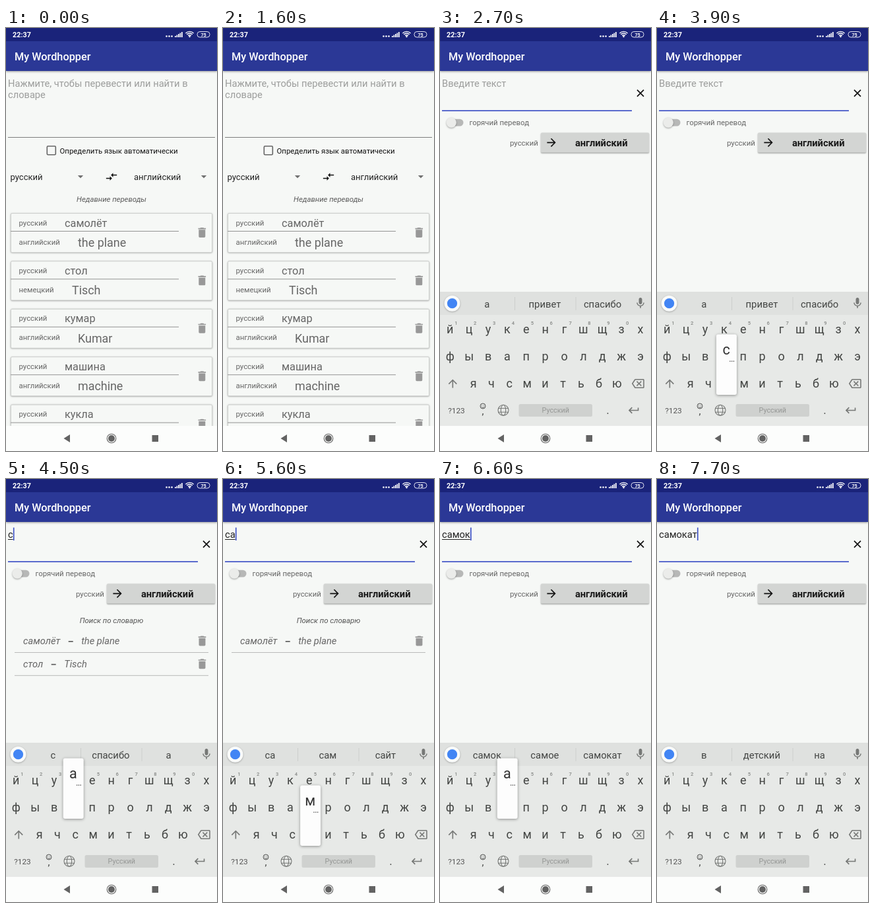
These frames come from a looping animation (320 px wide and 640 px high, 8000 ms). An HTML page with a canvas:

```html
<!DOCTYPE html>
<html lang="ru">
<head>
<meta charset="utf-8">
<title>My Wordhopper</title>
<style>
html, body { margin: 0; width: 100%; height: 100%; overflow: hidden; background: #f6f8f6; }
canvas { display: block; width: 320px; height: 640px; }
</style>
</head>
<body>
<canvas id="stage"></canvas>
<script>
const LOOP = 8000, STEP = 100;
const BG = '#f6f8f6', ACCENT = '#4053c6', GREY = '#666';
const canvas = document.getElementById('stage');
const ctx = canvas.getContext('2d');
const dpr = window.devicePixelRatio || 1;
canvas.width = 320 * dpr;
canvas.height = 640 * dpr;

// Icons on a 24-unit grid
const ICON = {
  trash: 'M6 19c0 1.1.9 2 2 2h8c1.1 0 2-.9 2-2V7H6v12zM19 4h-3.5l-1-1h-5l-1 1H5v2h14V4z',
  swap: 'M9 14H2v2h7v3l4-4-4-4v3zm6-1v-3h7V8h-7V5l-4 4 4 4z',
  right: 'M12 4l-1.41 1.41L16.17 11H4v2h12.17l-5.58 5.59L12 20l8-8z',
  up: 'M4 12l1.41 1.41L11 7.83V20h2V7.83l5.58 5.59L20 12l-8-8-8 8z',
  enter: 'M19 7v4H5.83l3.58-3.59L8 6l-6 6 6 6 1.41-1.41L5.83 13H21V7z',
  mic: 'M12 14c1.66 0 3-1.34 3-3V5c0-1.66-1.34-3-3-3S9 3.34 9 5v6c0 1.66 1.34 3 3 3zm5.3-3c0 3-2.54 5.1-5.3 5.1S6.7 14 6.7 11H5c0 3.41 2.72 6.23 6 6.72V21h2v-3.28c3.28-.48 6-3.3 6-6.72h-1.7z',
  erase: 'M22 3H7c-.69 0-1.23.35-1.59.88L0 12l5.41 8.11c.36.53.9.89 1.59.89h15c1.1 0 2-.9 2-2V5c0-1.1-.9-2-2-2zm0 16H7.07L2.4 12l4.66-7H22v14zm-11.59-2L14 13.41 17.59 17 19 15.59 15.41 12 19 8.41 17.59 7 14 10.59 10.41 7 9 8.41 12.59 12 9 15.59z'
};
for (const k in ICON) ICON[k] = new Path2D(ICON[k]);

function icon(name, cx, cy, scale, color) {
  ctx.save();
  ctx.translate(cx - 12 * scale, cy - 12 * scale);
  ctx.scale(scale, scale);
  ctx.fillStyle = color;
  ctx.fill(ICON[name]);
  ctx.restore();
}

function text(str, x, y, size, color, style = '', align = 'left') {
  ctx.font = `${style} ${size}px Roboto, sans-serif`;
  ctx.textAlign = align;
  ctx.fillStyle = color;
  ctx.fillText(str, x, y);
  return ctx.measureText(str).width;
}

function rect(x, y, w, h, color) {
  ctx.fillStyle = color;
  ctx.fillRect(x, y, w, h);
}

function box(x, y, w, h, r, color) {
  ctx.beginPath();
  ctx.roundRect(x, y, w, h, r);
  ctx.fillStyle = color;
  ctx.fill();
}

function disc(x, y, r, color) {
  ctx.beginPath();
  ctx.arc(x, y, r, 0, 7);
  ctx.fillStyle = color;
  ctx.fill();
}

function poly(points, color) {
  ctx.beginPath();
  points.forEach(([x, y]) => ctx.lineTo(x, y));
  ctx.fillStyle = color;
  ctx.fill();
}

function stroke(color, width, build) {
  ctx.beginPath();
  build();
  ctx.strokeStyle = color;
  ctx.lineWidth = width;
  ctx.stroke();
}

function shaded(blur, dy, alpha, draw) {
  ctx.save();
  ctx.shadowColor = `rgba(0,0,0,${alpha})`;
  ctx.shadowBlur = blur * dpr;
  ctx.shadowOffsetY = dy * dpr;
  draw();
  ctx.restore();
}

function header() {
  shaded(3, 1, 0.4, () => rect(0, 20, 320, 45, '#2b3896'));
  rect(0, 0, 320, 20, '#1a237a');
  text('22:37', 10, 14, 10.8, '#fff', 'bold');
  for (let i = 0; i < 3; i++) disc(243.5 + i * 4, 12.5, 1.3, '#fff');
  for (let i = 0; i < 5; i++) rect(256 + i * 2.5, 12 - i * 1.5, 1.7, 2 + i * 1.5, '#fff');
  for (const r of [3.2, 6, 8.6])
    stroke('#fff', 1.4, () => ctx.arc(278.5, 14, r, -Math.PI * 0.75, -Math.PI * 0.25));
  disc(278.5, 13, 1.2, '#fff');
  stroke('#dfe1f0', 1, () => ctx.roundRect(290, 5.5, 19, 8.5, 4));
  text('75', 299.5, 12.5, 7.2, '#fff', 'bold', 'center');
  text('My Wordhopper', 13, 49, 16.3, '#fff', '500');
}

function navButtons() {
  poly([[87.5, 621], [97, 615], [97, 627]], '#636363');
  stroke('#636363', 1.1, () => ctx.arc(160, 621, 6.8, 0, 7));
  disc(160, 621, 5, '#636363');
  rect(221.5, 616, 9.5, 10, '#636363');
}

const recent = [
  ['самолёт', 'английский', 'the plane'],
  ['стол', 'немецкий', 'Tisch'],
  ['кумар', 'английский', 'Kumar'],
  ['машина', 'английский', 'machine'],
  ['кукла', 'английский', 'doll']
];

function card([word, lang, translation], y) {
  shaded(2.5, 0.5, 0.5, () => box(7.5, y + 0.5, 305, 59, 1.5, BG));
  stroke('#cfd1cf', 1, () => ctx.roundRect(7.5, y + 0.5, 305, 59, 1.5));
  text('русский', 19.5, y + 18.5, 11.4, GREY);
  text(word, 89, y + 20.5, 16.3, GREY);
  rect(7, y + 27, 255, 1, '#949494');
  text(lang, 19.5, y + 47.5, 11.4, GREY);
  text(translation, lang === 'немецкий' ? 100 : 109, y + 51, 17.9, GREY);
  icon('trash', 297.3, y + 29.5, 0.83, '#989898');
}

function mainScreen() {
  text('Нажмите, чтобы перевести или найти в', 3, 89, 14.67, '#9c9d9c');
  text('словаре', 3, 106, 14.67, '#9c9d9c');
  rect(3, 165, 314, 1, '#7d7e7d');
  stroke('#666', 1.6, () => ctx.roundRect(62.3, 178.8, 13, 13, 1.5));
  text('Определить язык автоматически', 81.5, 190, 11.4, '#111');
  text('русский', 6.5, 230, 13.04, '#222');
  text('английский', 194, 230, 13.04, '#222');
  for (const x of [113, 300]) poly([[x - 4.2, 223], [x + 4.2, 223], [x, 227.2]], '#707070');
  icon('swap', 160, 225, 0.815, '#111');
  text('Недавние переводы', 160, 263, 11.4, '#5c5c5c', 'italic', 'center');
  ctx.save();
  ctx.beginPath();
  ctx.rect(0, 270, 320, 332);
  ctx.clip();
  recent.forEach((r, i) => card(r, 280 + i * 72.4));
  ctx.restore();
}

function dictionary(rows) {
  text('Поиск по словарю', 160, 218, 11.4, '#555', 'italic', 'center');
  rows.forEach(([word, , translation], i) => {
    const y = 250 + i * 34.8;
    const end = 26 + text(word, 26, y, 14.67, GREY, 'italic');
    rect(end + 12.5, y - 5, 7, 1.6, '#555');
    text(translation, end + 32, y, 14.67, GREY, 'italic');
    rect(13, y + 12, 294, 1, '#b9bab9');
    icon('trash', 297.5, y - 5, 0.83, '#989898');
  });
}

function editScreen(s) {
  const dy = s.compact ? -40.7 : 0;
  let caret = 3.2;
  if (s.typed) {
    const w = text(s.typed, 3, 89, 14.67, '#222');
    if (s.composing) rect(3, 91, w, 1, '#222');
    caret += w;
  } else {
    text('Введите текст', 3, 89, 14.67, '#9c9d9c');
  }
  if (s.caret) rect(caret, 73.5, 1.7, 19.5, ACCENT);
  rect(3, 165 + dy, 288, 1.7, ACCENT);

  const cy = s.compact ? 98.7 : 118.8;
  stroke('#111', 1.7, () => {
    for (const d of [1, -1]) {
      ctx.moveTo(299 , cy - 5 * d);
      ctx.lineTo(309, cy + 5 * d);
    }
  });

  box(12, 178.4 + dy, 23.5, 10.8, 5.4, '#b7b8b7');
  shaded(2.5, 1, 0.35, () => disc(17.2, 183.8 + dy, 7.6, '#ebecea'));
  text('горячий перевод', 44.5, 188 + dy, 11.4, GREY);
  text('русский', 106, 218.3 + dy, 11.4, GREY);
  shaded(2, 1, 0.4, () => box(153, 199.2 + dy, 164, 30, 1.5, '#d3d5d3'));
  icon('right', 169, 214 + dy, 0.83, '#111');
  text('английский', 244.7, 219.3 + dy, 14.67, '#1a1a1a', 'bold', 'center');
  if (s.found.length) dictionary(s.found);
}

const keyRows = [
  { keys: 'йцукенгшщзх', x: 15.3, step: 28.87, y: 461.5 },
  { keys: 'фывапролджэ', x: 15.3, step: 28.87, y: 502.5 },
  { keys: 'ячсмитьбю', x: 50.7, step: 27.2, y: 543.5 }
];
const INK = '#434543', SOFT = '#767876';

function keyboard(words, pressed) {
  rect(0, 399, 320, 203, '#e7e9e7');
  rect(0, 399, 320, 35, '#dfe1df');
  rect(0, 602, 320, 38, '#fcfdfc');
  if (pressed) rect(114, 400, 92, 34, '#cfd1cf');
  shaded(2.5, 0.7, 0.3, () => disc(18.5, 416.7, 12, '#fafbfa'));
  disc(18.5, 416.7, 7.6, '#4285f4');
  words.forEach((w, i) => text(w, 71.3 + i * 87.6, 422.5, 14.8, INK, '', 'center'));
  for (const x of [113, 205.5]) rect(x, 407, 1, 20, '#cdcfcd');
  icon('mic', 304, 416.3, 0.82, SOFT);

  keyRows.forEach((row, r) => [...row.keys].forEach((k, i) => {
    const x = row.x + i * row.step;
    text(k, x, row.y, 18, INK, '', 'center');
    if (r === 0 && i < 10) text((i + 1) % 10, x + 9, 448.5, 7.5, '#868886', '500', 'center');
  }));

  icon('up', 19.3, 538, 0.82, SOFT);
  icon('erase', 300.3, 538, 0.79, SOFT);
  text('?123', 25, 582.5, 11.8, '#555', '', 'center');
  stroke(INK, 0.9, () => ctx.arc(65, 572, 4, 0, 7));
  stroke(INK, 0.8, () => ctx.arc(65, 572.3, 2.1, 0.2, Math.PI - 0.2));
  for (const x of [63.5, 66.5]) disc(x, 570.8, 0.6, INK);
  text(',', 65, 585, 15, INK, '', 'center');
  stroke(SOFT, 1.1, () => ctx.arc(96, 578.3, 8, 0, 7));
  stroke(SOFT, 1.1, () => ctx.ellipse(96, 578.3, 3.7, 8, 0, 0, 7));
  for (const y of [575.4, 581.2]) rect(88.6, y - 0.5, 14.8, 1, SOFT);
  box(119.5, 569, 111.5, 19, 2.5, '#cfd1cf');
  text('Русский', 175.3, 582.3, 10.8, '#969896', '', 'center');
  text('.', 254.5, 584, 17, INK, '', 'center');
  icon('enter', 294, 578.5, 0.82, SOFT);
}

function popup(letter) {
  const row = keyRows.find(r => r.keys.includes(letter));
  const x = row.x + row.keys.indexOf(letter) * row.step;
  shaded(4, 1, 0.4, () => box(x - 15.2, row.y - 80, 31, 91.5, 3, '#fdfdfd'));
  text(letter, x, row.y - 49.5, 21.5, '#333', '', 'center');
  for (let i = 0; i < 3; i++) rect(x + 5 + i * 2.8, row.y - 40, 1.4, 1.4, '#555');
}

const typing = [[2200, ''], [4200, 'с'], [4600, 'са'], [5700, 'сам'], [6100, 'само'],
  [6500, 'самок'], [6800, 'самока'], [7700, 'самокат']];
const hints = [[0, 'а привет спасибо'], [4200, 'с спасибо а'], [4700, 'са сам сайт'],
  [5800, 'сам сама самые'], [6100, 'само самое самом'], [6500, 'самок самое самокат'],
  [6900, 'самока самокат самокаты'], [7700, 'в детский на']];
const matches = [[0, 0], [4200, 2], [4700, 1], [6500, 0]];
const presses = [[3900, 4000, 'с'], [4500, 4600, 'а'], [5600, 5700, 'м'],
  [5900, 6100, 'о'], [6400, 6500, 'к'], [6600, 6800, 'а']];

const latest = (list, t) => list.filter(e => e[0] <= t).pop() || list[0];
const clamp = v => Math.min(1, Math.max(0, v));

function draw(t) {
  ctx.setTransform(dpr, 0, 0, dpr, 0, 0);
  ctx.globalAlpha = 1;
  rect(0, 0, 320, 640, BG);

  const fade = clamp((t - 2000) / 300);
  const [since, typed] = latest(typing, t);
  if (fade < 1) {
    ctx.globalAlpha = 1 - fade;
    mainScreen();
  }
  if (fade > 0) {
    ctx.globalAlpha = fade;
    editScreen({
      typed,
      composing: t < 7700,
      caret: t >= since && (t - since) % 1000 < 500,
      compact: t >= 2500,
      found: recent.slice(0, latest(matches, t)[1])
    });
  }
  ctx.globalAlpha = 1;
  header();
  rect(0, 602, 320, 38, '#fcfdfc');

  const rise = clamp((t - 2400) / 300);
  if (rise > 0) {
    ctx.save();
    ctx.globalAlpha = rise;
    ctx.translate(0, 203 * (1 - rise) ** 2);
    keyboard(latest(hints, t)[1].split(' '), t >= 7600 && t < 7700);
    ctx.restore();
  }
  const press = presses.find(p => t >= p[0] && t < p[1]);
  if (press) popup(press[2]);
  navButtons();
}

const start = performance.now();
function frame() {
  const t = (performance.now() - start) % LOOP;
  draw(Math.floor(t / STEP) * STEP);
  requestAnimationFrame(frame);
}
frame();
</script>
</body>
</html>
```
